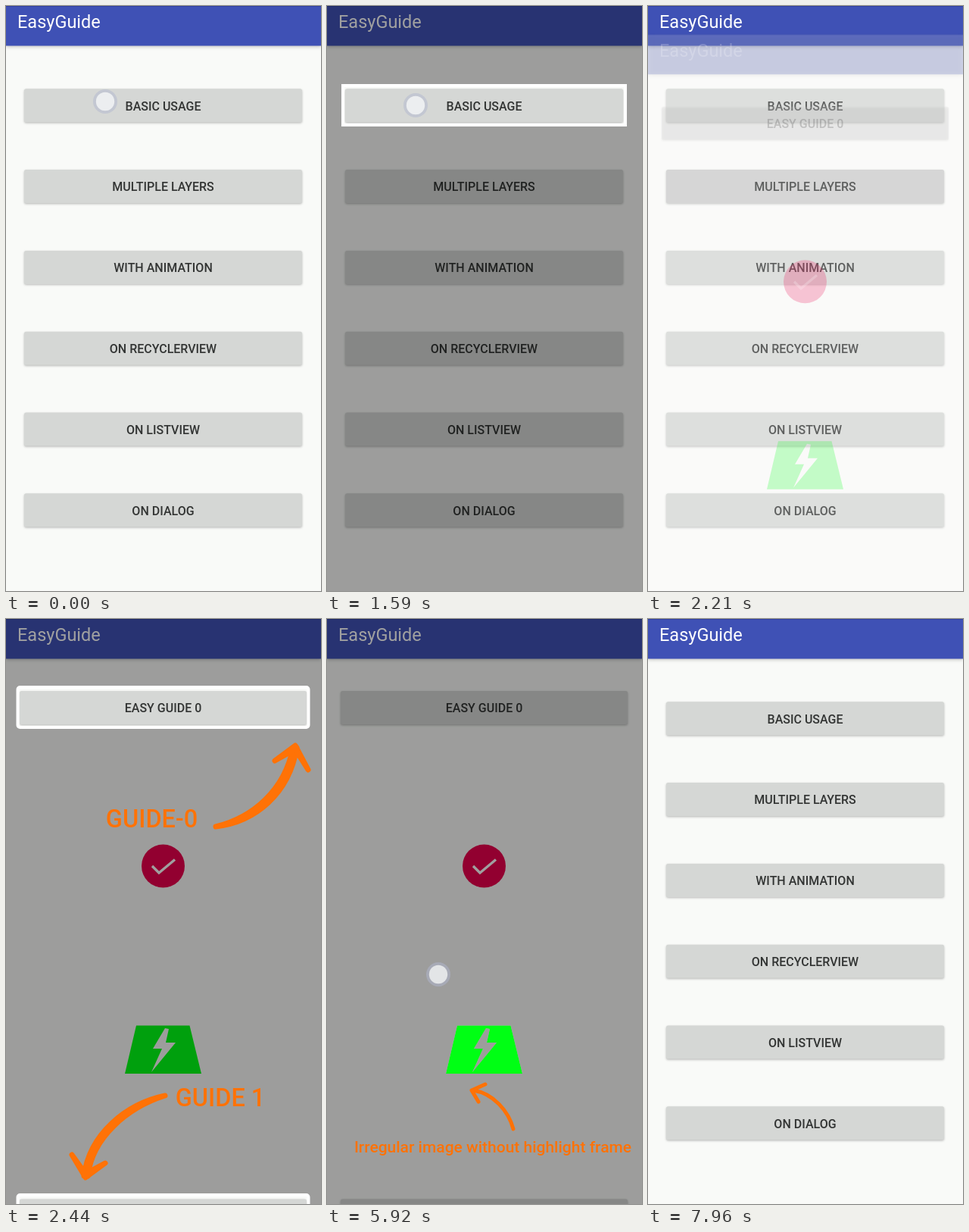
An HTML page with a canvas that plays this animation: 416x772 px, repeating every 8000 ms.

```html
<!DOCTYPE html>
<html lang="en">
<head>
<meta charset="utf-8">
<title>EasyGuide</title>
<style>
  html, body { margin: 0; height: 100%; overflow: hidden; background: #f9faf8; }
  canvas { display: block; }
</style>
</head>
<body>
<canvas width="416" height="772"></canvas>
<script>
const W = 416, H = 772, LOOP = 8000, CENTER = 207.5;
const PAPER = '#f9faf8', ORANGE = '#ff7206';
const ctx = document.querySelector('canvas').getContext('2d');

const MENU = ['BASIC USAGE', 'MULTIPLE LAYERS', 'WITH ANIMATION',
  'ON RECYCLERVIEW', 'ON LISTVIEW', 'ON DIALOG'];

const badge = new Path2D('M172 536.5H242.5L258 600H157Z' +
  'M210 540L194 567H206L192 598L224 559H211L215 541Z');

function rect(x, y, w, h, r) {
  const path = new Path2D();
  path.roundRect(x, y, w, h, r);
  return path;
}

function disc(x, y, r) {
  const path = new Path2D();
  path.arc(x, y, r, 0, Math.PI * 2);
  return path;
}

// Each guide: holes in the dim layer, white frames, arrows and a label.
const basicGuide = { frames: [rect(21, 105, 373, 52, 0)] };

const buttonsGuide = {
  frames: [rect(15.5, 90, 384, 53, 3), rect(15.5, 760, 384, 53, 3)],
  arrows: ['M277 274C326 262 368 226 379 170H384C374 230 330 268 277 274Z',
    'M355 187L382 167L399 199L382 172Z',
    'M210 629C158 640 110 680 103 735H108C114 684 160 645 210 629Z',
    'M87 707L105 737L131 718L105 732Z'],
  arrowWidth: 7,
  labels: [['GUIDE-0', 192.5, 275, 32.5], ['GUIDE 1', 283, 643, 32.5]]
};

const circleGuide = {
  frames: [disc(CENTER, 326, 31.5)],
  frameWidth: 5.5,
  arrows: ['M294 415C288 390 268 368 240 364', 'M257 355L239 363L248 378'],
  arrowWidth: 5,
  labels: [['CIRCLE-GUIDE', 267, 459, 32.3]]
};

const badgeGuide = {
  holes: [badge],
  arrows: ['M246 673C240 650 220 626 193 622', 'M209 614L191 622L200 637'],
  arrowWidth: 5,
  labels: [['Irregular image without highlight frame', 219, 704, 21]]
};

// [from, to, value] spans in milliseconds
const GUIDES = [
  [220, 1670, basicGuide], [2440, 3600, buttonsGuide],
  [3600, 4940, circleGuide], [4940, 6300, badgeGuide]
];
const PRESSED = [[70, 220, 0], [2060, 2360, 1]];
const TOUCHES = [
  [0, 70, [131, 126, 1]], [1590, 1670, [117, 131, 1]], [2060, 2130, [120, 240, 1]],
  [3320, 3600, [124, 119, 1]], [3600, 4570, [124, 119, .65]],
  [4570, 4940, [141, 258, 1]], [4940, 5920, [141, 258, .65]],
  [5920, 6300, [147, 469, 1]]
];

const at = (spans, t) => spans.find(([from, to]) => t >= from && t < to)?.[2];
const progress = (t, from, to) => Math.min(1, Math.max(0, (t - from) / (to - from)));

function text(label, x, y, size, color, weight = 500, align = 'center') {
  ctx.font = `${weight} ${size}px Roboto, sans-serif`;
  ctx.textAlign = align;
  ctx.fillStyle = color;
  ctx.fillText(label, x, y);
}

function stroke(path, color, width, cap = 'round', join = cap) {
  ctx.strokeStyle = color;
  ctx.lineWidth = width;
  ctx.lineCap = cap;
  ctx.lineJoin = join;
  ctx.stroke(path);
}

function fillShadowed(path, color, blur, offset) {
  ctx.save();
  ctx.shadowColor = 'rgba(0,0,0,.26)';
  ctx.shadowBlur = blur;
  ctx.shadowOffsetY = offset;
  ctx.fillStyle = color;
  ctx.fill(path);
  ctx.restore();
}

function button(label, x, y, w, pressed) {
  fillShadowed(rect(x, y, w, 44, 2.5), pressed ? '#cbcbcb' : '#d5d7d5', 3, 1.2);
  text(label, CENTER, y + 28.3, 16, '#323433');
}

function page() {
  ctx.fillStyle = PAPER;
  ctx.fillRect(0, 0, W, H);
  fillShadowed(rect(0, 0, W, 52.5, 0), '#3f51b5', 5, 1.5);
  ctx.fillStyle = '#303f9f';
  ctx.fillRect(0, 0, W, 1);
  text('EasyGuide', 15, 29.3, 23.5, '#fff', 400, 'left');
}

function menuPage(pressed) {
  page();
  MENU.forEach((label, i) => button(label, 24, 109.3 + i * 106.8, 367, i === pressed));
}

function layersPage() {
  page();
  button('EASY GUIDE 0', 18, 95, 379);
  button('EASY GUIDE 1', 18, 765.5, 379);
  ctx.fillStyle = '#e8004c';
  ctx.fill(disc(CENTER, 326, 28.5));
  stroke(new Path2D('M193 326L202 335L223 317.5'), '#fff', 3.3, 'butt', 'miter');
  ctx.fillStyle = '#00ff14';
  ctx.fill(badge, 'evenodd');
}

function drawGuide({ holes, frames = [], frameWidth = 4, arrows = [], arrowWidth, labels = [] }) {
  const shade = rect(0, 0, W, H, 0);
  (holes || frames).forEach(hole => shade.addPath(hole));
  ctx.fillStyle = 'rgba(0,0,0,.373)';
  ctx.fill(shade, 'evenodd');
  frames.forEach(frame => stroke(frame, '#fff', frameWidth, 'butt', 'miter'));
  arrows.forEach(d => stroke(new Path2D(d), ORANGE, arrowWidth));
  labels.forEach(([label, x, y, size]) => text(label, x, y, size, ORANGE));
}

function drawTouch([x, y, alpha]) {
  ctx.save();
  ctx.globalAlpha = alpha;
  stroke(disc(x, y, 14), 'rgba(178,184,208,.5)', 4);
  ctx.fillStyle = 'rgba(240,242,244,.85)';
  ctx.fill(disc(x, y, 12.2));
  ctx.restore();
}

function draw(t) {
  menuPage(at(PRESSED, t));

  // The second page fades and slides in, then back out.
  const shown = progress(t, 2150, 2430) * (1 - progress(t, 7460, 7760));
  if (shown > 0) {
    ctx.save();
    ctx.globalAlpha = shown;
    ctx.translate(0, (1 - shown) ** 2 * H * .08);
    layersPage();
    ctx.restore();
  }

  const guide = at(GUIDES, t);
  if (guide) drawGuide(guide);
  const touch = at(TOUCHES, t);
  if (touch) drawTouch(touch);
}

function tick() {
  draw(performance.now() % LOOP);
  requestAnimationFrame(tick);
}
tick();
</script>
</body>
</html>
```
